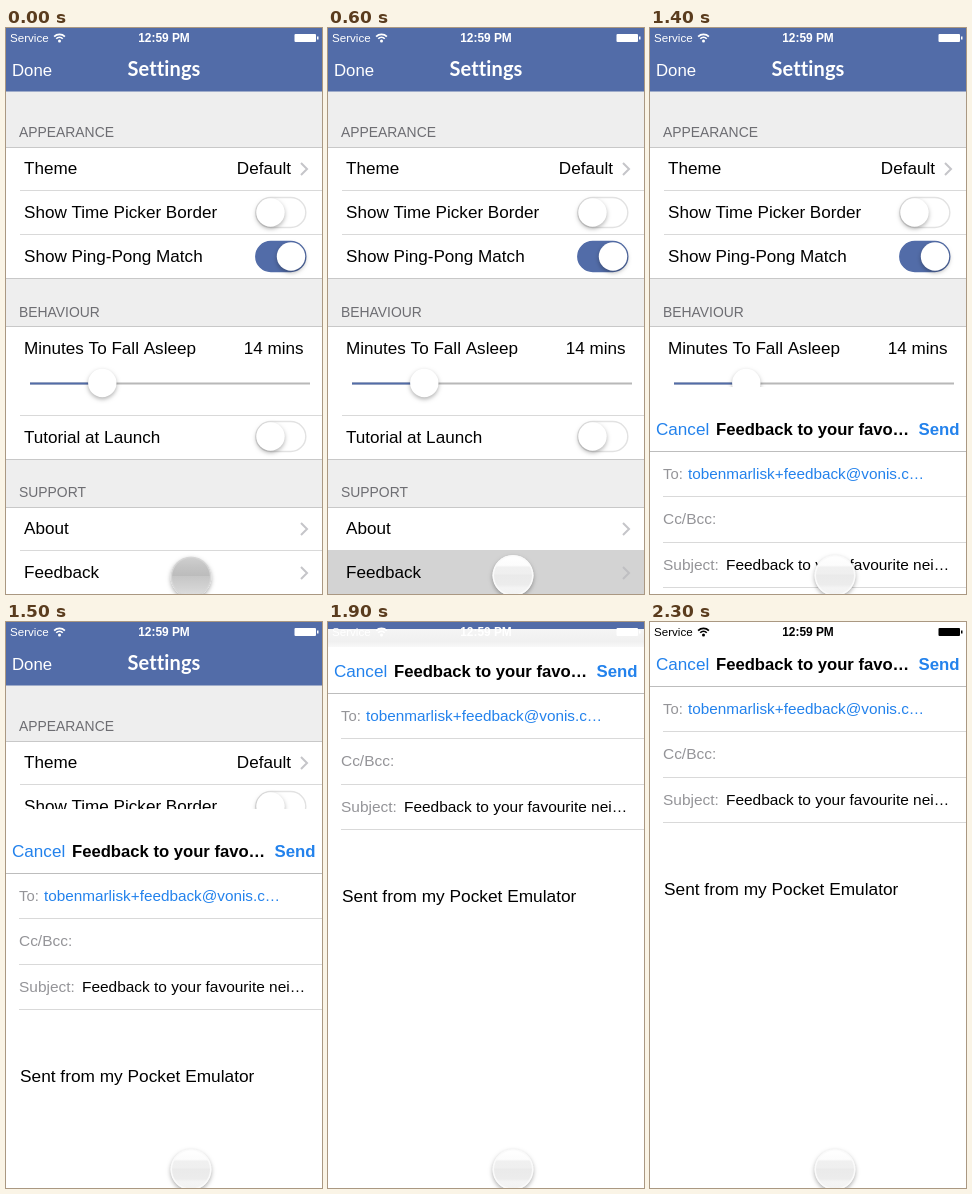
Recreate the animation shown at these times as an HTML page with a canvas. Size 316 by 566 pixels, loop 2.4 s.

```html
<!DOCTYPE html>
<html lang="en">
<head>
<meta charset="utf-8">
<title>Settings to feedback</title>
<style>
html, body { margin: 0; width: 100%; height: 100%; overflow: hidden; background: #fff; }
canvas { display: block; width: 316px; height: 566px; }
</style>
</head>
<body>
<canvas id="stage" width="316" height="566"></canvas>
<script>
const ctx = document.getElementById('stage').getContext('2d');
const W = 316, H = 566, LOOP = 2400, TICK = 100;
const BLUE = '#526ca8', LINK = '#2382ec', GROUP = '#eeeeee', RULE = '#d9d9d9', EDGE = '#c8c8c8';
const SANS = '"Liberation Sans", Arial, sans-serif';

// Top edge of the mail sheet on each tick from 1200 ms, a decelerating spring.
const SHEET_START = 1200;
const SHEET_TOPS = [566, 543, 359, 187, 92, 43, 18, 7, 3, 1, 0];

function rect(x, y, w, h, color) {
  ctx.fillStyle = color;
  ctx.fillRect(x, y, w, h);
}

function text(str, x, y, { size = 17.1, color = '#000', weight = 400, align = 'left', family = SANS, tracking = 0 } = {}) {
  ctx.font = `${weight} ${size}px ${family}`;
  ctx.letterSpacing = `${tracking}px`;
  ctx.textAlign = align;
  ctx.fillStyle = color;
  ctx.fillText(str, x, y);
}

function circle(x, y, r, fill) {
  ctx.beginPath();
  ctx.arc(x, y, r, 0, Math.PI * 2);
  ctx.fillStyle = fill;
  ctx.fill();
}

function shadowed(blur, offset, alpha, draw) {
  ctx.save();
  ctx.shadowColor = `rgba(0,0,0,${alpha})`;
  ctx.shadowBlur = blur;
  ctx.shadowOffsetY = offset;
  draw();
  ctx.restore();
}

function verticalGradient(y0, y1, stops) {
  const gradient = ctx.createLinearGradient(0, y0, 0, y1);
  stops.forEach(([at, color]) => gradient.addColorStop(at, color));
  return gradient;
}

function knob(x, y) {
  shadowed(4, 2, 0.3, () => circle(x, y, 14.2, '#fff'));
}

function toggle(y, on) {
  ctx.beginPath();
  ctx.roundRect(249.8, y - 15, 50, 30, 15);
  ctx.fillStyle = on ? BLUE : '#fff';
  ctx.fill();
  ctx.strokeStyle = on ? BLUE : '#e2e2e2';
  ctx.lineWidth = 1.4;
  ctx.stroke();
  knob(on ? 285 : 264.5, y);
}

function chevron(y, color = '#c5c5c9') {
  ctx.beginPath();
  ctx.moveTo(295, y - 6);
  ctx.lineTo(301, y);
  ctx.lineTo(295, y + 6);
  ctx.strokeStyle = color;
  ctx.lineWidth = 2;
  ctx.stroke();
}

function group(title, top, bottom, baseline) {
  rect(0, top, W, bottom - top, GROUP);
  if (top > 64) rect(0, top, W, 1, EDGE);
  rect(0, bottom, W, 1, EDGE);
  text(title, 13, baseline, { size: 13.9, color: '#6d6d72' });
}

function slider() {
  rect(24, 354.5, 280, 2, '#b8b8b8');
  rect(24, 354.5, 72, 2, BLUE);
  knob(96.3, 355);
}

function settings(pressed) {
  rect(0, 0, W, H, '#fff');
  group('APPEARANCE', 63, 119, 109);
  group('BEHAVIOUR', 250, 298, 288.5);
  group('SUPPORT', 431, 479, 469);
  rect(0, 0, W, 63.5, BLUE);
  text('Done', 6, 48, { size: 16.8, color: '#fff' });
  text('Settings', 158, 48, {
    size: 20, weight: 700, color: '#fff', align: 'center', family: 'Lato, sans-serif', tracking: 0.1
  });

  [162, 206, 387, 522].forEach(y => rect(14, y, W - 14, 1, RULE));
  if (pressed) rect(0, 522, W, H - 522, '#d3d3d3');

  text('Theme', 18, 146);
  text('Default', 285, 146, { align: 'right' });
  chevron(141);
  text('Show Time Picker Border', 18, 190);
  toggle(184.5, false);
  text('Show Ping-Pong Match', 18, 234);
  toggle(228.5, true);
  text('Minutes To Fall Asleep', 18, 326);
  text('14 mins', 297.5, 326, { align: 'right' });
  slider();
  text('Tutorial at Launch', 18, 415);
  toggle(408.5, false);
  text('About', 18, 506);
  chevron(501);
  text('Feedback', 18, 550);
  chevron(545, pressed ? '#bfbfc2' : undefined);
}

function mailSheet(top, blurred) {
  ctx.save();
  ctx.translate(0, top);
  rect(0, 0, W, H, '#fff');
  if (blurred) rect(0, 0, W, 18, verticalGradient(0, 18, [[0, '#f5f5f5'], [0.7, '#f0f0f0'], [1, '#f8f8f8']]));
  text('Cancel', 6, 48, { color: LINK });
  text('Feedback to your favo…', 66, 48, { size: 16.65, weight: 700 });
  text('Send', 309.5, 48, { size: 16.8, weight: 700, color: LINK, align: 'right' });
  rect(0, 64, W, 1, '#bdbdbd');

  const field = { size: 15.45 }, label = { size: 15.45, color: '#949498' };
  text('To:', 13, 92, { ...label, size: 14.8 });
  text('tobenmarlisk+feedback@vonis.c…', 38, 92, { size: 15.3, color: LINK });
  text('Cc/Bcc:', 13, 137, label);
  text('Subject:', 13, 182.5, label);
  text('Feedback to your favourite nei…', 76, 182.5, field);
  [109, 155, 200].forEach(y => rect(13, y, W - 13, 1, RULE));
  text('Sent from my Pocket Emulator', 14, 273, { size: 17.3 });
  ctx.restore();
}

function statusBar(color) {
  text('Service', 4, 14, { size: 11.6, color });
  text('12:59 PM', 158, 14, { size: 11.9, weight: 700, color, align: 'center' });
  ctx.strokeStyle = color;
  ctx.lineWidth = 1.7;
  [4.6, 7.6].forEach(r => {
    ctx.beginPath();
    ctx.arc(53.5, 14, r, -Math.PI * 0.75, -Math.PI * 0.25);
    ctx.stroke();
  });
  circle(53.5, 13, 1.5, color);
  ctx.beginPath();
  ctx.roundRect(288.5, 6, 21.5, 8, 1);
  ctx.fill();
  rect(311, 8.5, 1.5, 3, color);
}

// The touch marker fades from its dark pressed look to white.
function touch(press, y) {
  const x = 185, r = 20.5;
  const shade = stops => verticalGradient(y - r, y + r, stops);
  shadowed(4, 2, 0.32, () => circle(x, y, r, '#f6f6f6'));
  circle(x, y, r, '#fafafa');
  circle(x, y, r - 1.5, shade([
    [0, '#ffffff'], [0.25, '#fcfcfc'], [0.3, '#f0f0f0'], [0.47, '#efefef'],
    [0.48, '#eaeaea'], [0.72, '#ececec'], [0.8, '#f4f4f4'], [1, '#f2f2f2']
  ]));
  if (press <= 0) return;
  ctx.globalAlpha = press;
  circle(x, y, r, '#d6d6d6');
  circle(x, y, r - 1.5, shade([
    [0, '#d0d0d0'], [0.25, '#c4c4c4'], [0.47, '#bcbcbc'], [0.48, '#c6c6c6'], [0.75, '#d2d2d2'], [1, '#e0e0e0']
  ]));
  ctx.globalAlpha = 1;
}

function render(time) {
  const t = Math.floor(time / TICK) * TICK;
  const step = (t - SHEET_START) / TICK;
  const top = step < 0 ? H : SHEET_TOPS[Math.min(step, SHEET_TOPS.length - 1)];
  const settled = t >= 2100;

  settings(t >= 200);
  if (top < H) mailSheet(top, top < 64 && !settled);
  statusBar(settled ? '#000' : '#fff');
  touch(Math.max(0, 1 - t / 500), t < 200 ? 549 : 547.5);
}

const start = performance.now();
function loop() {
  render((performance.now() - start) % LOOP);
  requestAnimationFrame(loop);
}
loop();
</script>
</body>
</html>
```
